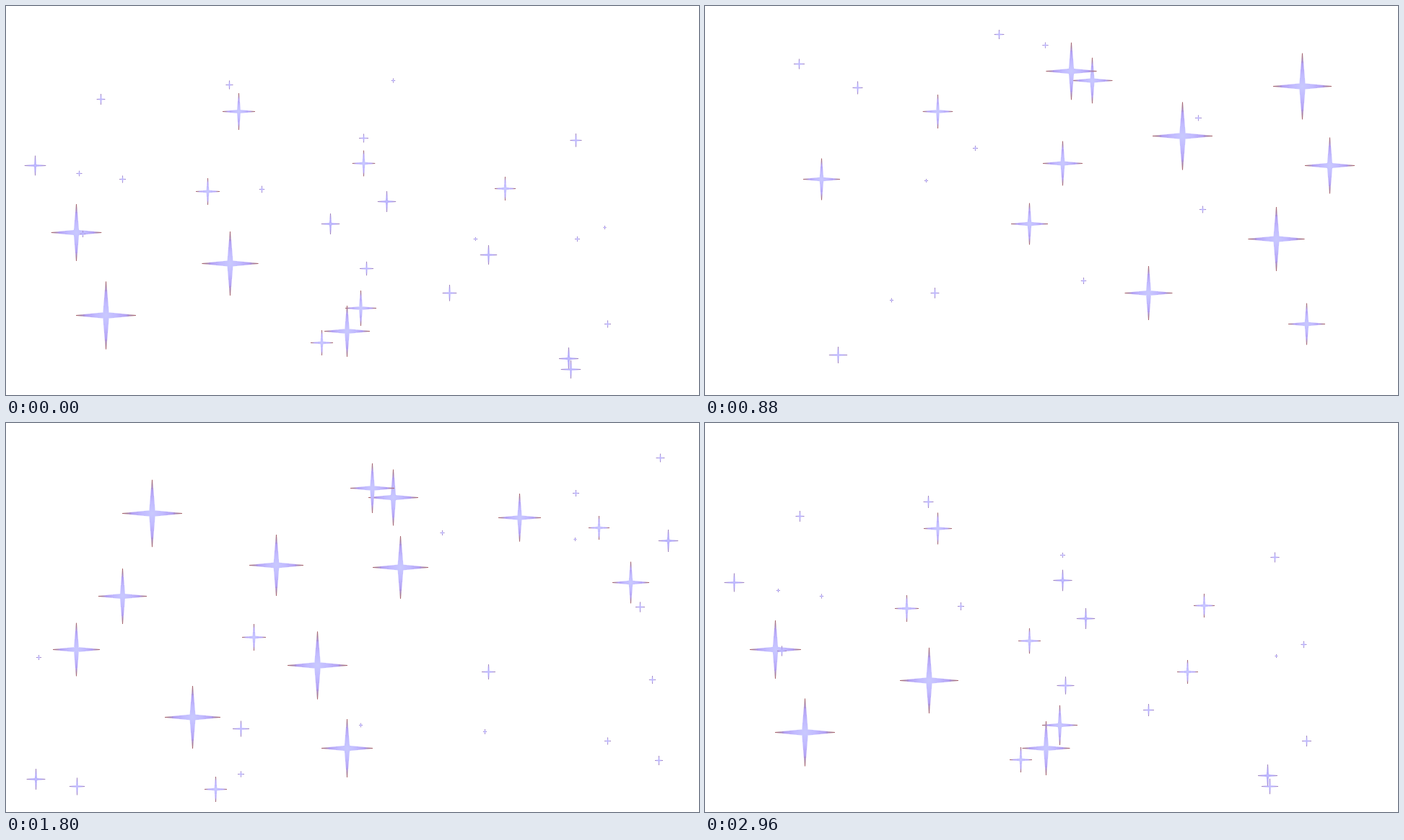
Recreate the animation shown at these times as an HTML page. Size 960 by 540 pixels, loop 3000 ms.

```html
<!DOCTYPE html>
<html lang="en">
<head>
<meta charset="utf-8">
<title>Twinkling stars</title>
<style>
  html, body { margin: 0; width: 100%; height: 100%; overflow: hidden; background: #fff; }
  svg { display: block; width: 960px; height: 540px; }
  path { stroke-width: .8; stroke-linejoin: round; shape-rendering: crispEdges; }
</style>
</head>
<body>
<svg id="sky" viewBox="0 0 960 540">
  <defs>
    <radialGradient id="bright">
      <stop offset="0" stop-color="#c9c9ff"/>
      <stop offset=".35" stop-color="#c1baff"/>
      <stop offset=".68" stop-color="#b2a0f2"/>
      <stop offset=".85" stop-color="#a8809c"/>
      <stop offset="1" stop-color="#a86468"/>
    </radialGradient>
    <radialGradient id="faint">
      <stop offset="0" stop-color="#c0bcff"/>
      <stop offset=".5" stop-color="#b0a4f6"/>
      <stop offset="1" stop-color="#a184b8"/>
    </radialGradient>
  </defs>
</svg>
<script>
const LOOP = 3000, STEP = 40;
const sky = document.getElementById('sky');

// x, y, peak times
const brightStars = [
  [97, 314, 2920, 1650],
  [310, 357, 2860],
  [138, 429, 2985],
  [322, 146, 430],
  [161, 240, 600, 1680],
  [472, 451, 2820, 1760],
  [614, 398, 610],
  [449, 302, 2540, 600],
  [495, 218, 520],
  [536, 103, 640, 1700],
  [507, 90, 950, 2000],
  [661, 180, 880],
  [827, 111, 790],
  [865, 221, 780, 2080],
  [791, 323, 740],
  [833, 441, 2400, 600],
  [374, 197, 1620],
  [202, 125, 1750],
  [258, 408, 1640],
  [431, 336, 1810],
  [546, 200, 1960],
  [711, 131, 2130],
  [668, 345, 2420],
  [491, 419, 2560]
];

// peak time, then x, y of each twinkle from large to small
const twinkles = [
  [2980, 279, 257, 437, 467, 691, 253, 779, 489, 527, 271],
  [560, 354, 46, 456, 148, 392, 486, 85, 475, 552, 166],
  [1200, 845, 276, 917, 265, 592, 490, 821, 283, 207, 304],
  [1800, 343, 297, 290, 508, 821, 145, 917, 163, 41, 494],
  [2200, 393, 254, 149, 78, 149, 268, 397, 287, 236, 498],
  [2520, 42, 268, 890, 257, 635, 242, 143, 249, 741, 458]
];

let seed = 41;
const random = () => (seed = seed * 16807 % 2147483647) / 2147483647;
const between = (a, b) => a + (b - a) * random();

// Raised cosine around a peak, with time wrapping at the loop
function swell(dt, half) {
  const d = Math.abs(((dt % LOOP) + LOOP * 1.5) % LOOP - LOOP / 2);
  return d < half ? Math.cos(Math.PI / 2 * d / half) ** 2 : 0;
}

const stars = [];
function addStar(x, y, peaks, size, half, aspect = .88) {
  const node = document.createElementNS('http://www.w3.org/2000/svg', 'path');
  sky.append(node);
  stars.push({ x: x + .5, y: y + .5, peaks, size, half, aspect, node });
}

for (const [x, y, ...peaks] of brightStars) {
  const single = peaks.length === 1;
  addStar(x, y, peaks, single ? 94 : 81, single ? 900 : 775);
}

for (const [time, ...points] of twinkles) {
  for (let i = 0; i < points.length; i += 2) {
    addStar(points[i], points[i + 1], [time], 37 - i, 300);
  }
}

const SPARKS = 110;
for (let i = 0; i < SPARKS; i++) {
  addStar(Math.round(between(40, 920)), Math.round(between(30, 515)),
    [i * LOOP / SPARKS], 8 + 20 * random() ** 1.4, 240, between(.75, 1.15));
}

function starPath(x, y, height, aspect) {
  const v = height / 2, h = v * aspect, core = height * .04, arm = height * .026;
  const quarter = [[0, -v], [arm, -v * .42], [core, -core], [h * .42, -arm]];
  const mirror = (sx, sy) => quarter.map(([a, b]) => [a * sx, b * sy]);
  const points = [
    ...mirror(1, 1), [h, 0], ...mirror(1, -1).reverse(),
    ...mirror(-1, -1), [-h, 0], ...mirror(-1, 1).reverse()
  ];
  return 'M' + points.map(([a, b]) => `${(x + a).toFixed(2)},${(y + b).toFixed(2)}`).join('L') + 'Z';
}

function render(time) {
  const t = Math.floor(time % LOOP / STEP) * STEP;
  for (const { x, y, peaks, size, half, aspect, node } of stars) {
    const height = size * Math.max(...peaks.map(peak => swell(t - peak, half)));
    if (height < 4) {
      node.setAttribute('display', 'none');
      continue;
    }
    const paint = height < 32 ? 'url(#faint)' : 'url(#bright)';
    node.removeAttribute('display');
    node.setAttribute('d', starPath(x, y, height, aspect));
    node.setAttribute('fill', paint);
    node.setAttribute('stroke', paint);
  }
}

const start = performance.now();
function tick() {
  render(performance.now() - start);
  requestAnimationFrame(tick);
}
tick();
</script>
</body>
</html>
```
